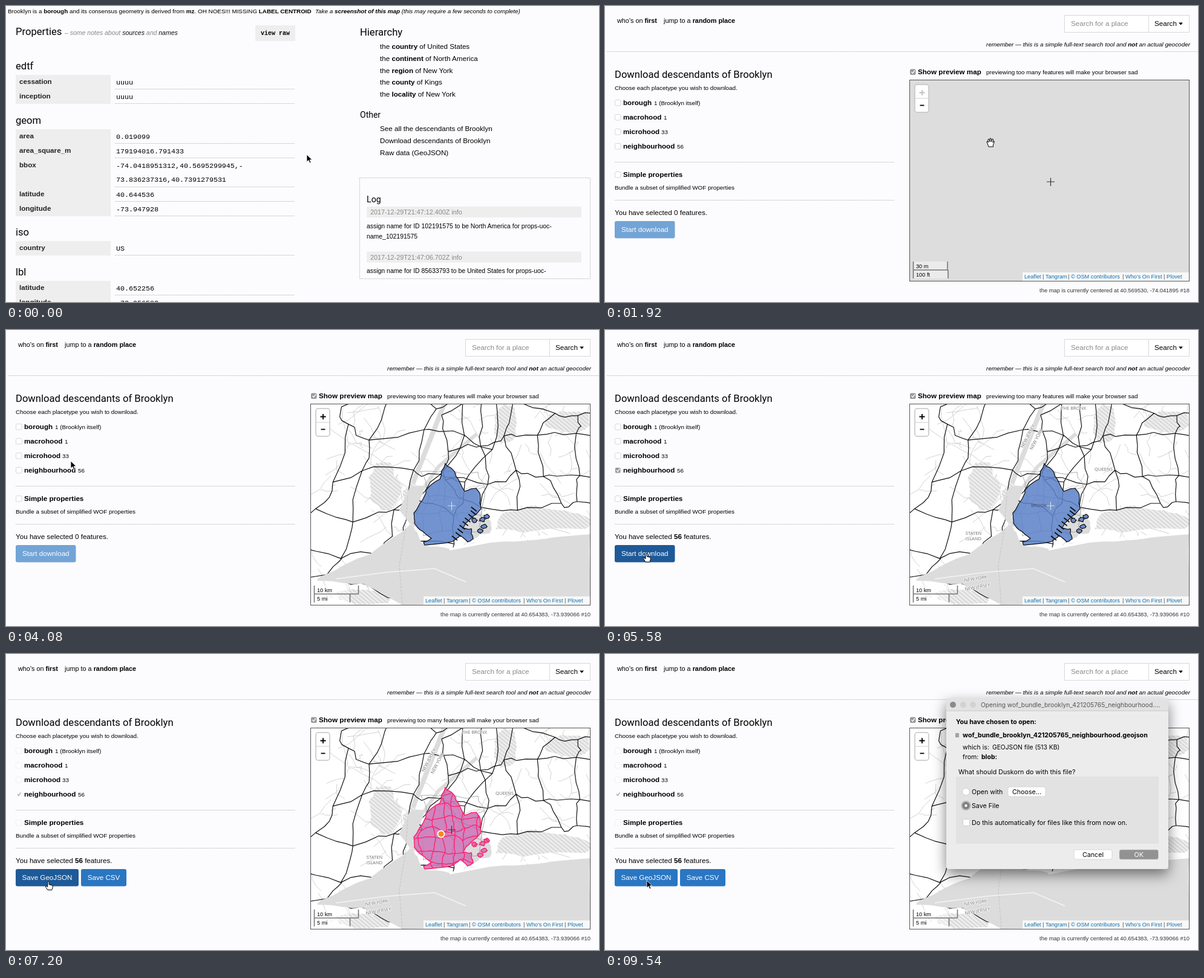
An HTML page for the animation above (9600 ms loop, 980 by 490 pixels).

```html
<!DOCTYPE html>
<html lang="en">
<head>
<meta charset="utf-8">
<title>Download descendants</title>
<style>
  html, body { margin: 0; height: 100%; overflow: hidden; background: #fcfcfe; }
  svg { display: block; font-family: "Liberation Sans", Arial, sans-serif; }
  .head { font-family: Roboto, sans-serif; }
  .mono { font-family: "Liberation Mono", monospace; }
  .mac { font-family: Inter, sans-serif; }
  .place { font-family: "Open Sans", sans-serif; fill: #777; text-anchor: middle;
           stroke: #fafafa; stroke-width: 1.6px; paint-order: stroke; }
  .dots { fill: none; stroke: #bdbdbd; stroke-dasharray: 1.5 1; }
  .line { fill: none; stroke-linejoin: round; }
  #dialog { filter: drop-shadow(0 9px 11px rgba(0, 0, 0, .5)); }
</style>
</head>
<body>
<svg id="stage" width="980" height="490" viewBox="0 0 980 490"></svg>
<script>
const SMALL = 9.87, BODY = 11.65, TITLE = 16.6;
const PALE = '#eee', SEA = '#dcdcdc', GREY = '#888', BLUE = '#2a76c2', DARK_BLUE = '#1e5a98';
const $ = id => document.getElementById(id);

const text = (x, y, size, str, attrs = '') =>
  `<text x="${x}" y="${y}" font-size="${size}" ${attrs}>${str}</text>`;
const b = str => `<tspan font-weight="700">${str}</tspan>`;
const rect = (x, y, w, h, fill, attrs = '') =>
  `<rect x="${x}" y="${y}" width="${w}" height="${h}" fill="${fill}" ${attrs}/>`;
const dot = (x, y, r, fill, attrs = '') => `<circle cx="${x}" cy="${y}" r="${r}" fill="${fill}" ${attrs}/>`;
const path = (d, attrs) => `<path d="${d}" ${attrs}/>`;
const stroke = (d, color, width, attrs = '') =>
  path(d, `class="line" stroke="${color}" stroke-width="${width}" ${attrs}`);
const rule = (x1, x2, y) => path(`M${x1} ${y}.5H${x2}`, 'class="dots"');
const group = (id, body, attrs = '') => `<g id="${id}" ${attrs}>${body}</g>`;
const italic = 'font-style="italic"', bold = 'font-weight="700"', head = 'class="head"';

// ---- Record page
function recordPage() {
  const sections = [
    ['edtf', 114, [['cessation', 'uuuu'], ['inception', 'uuuu']]],
    ['geom', 204, [['area', '0.019099'], ['area_square_m', '179194016.791433'],
      ['bbox', '-74.0418951312,40.5695299945,-', '73.836237316,40.7391279531'],
      ['latitude', '40.644536'], ['longitude', '-73.947928']]],
    ['iso', 389, [['country', 'US']]],
    ['lbl', 455, [['latitude', '40.652256'], ['longitude', '-73.956582']]],
  ];
  const table = sections.map(([name, top, rows]) => {
    let out = text(16, top - 9.5, TITLE, name, head), y = top;
    for (const [key, ...values] of rows) {
      const h = 24 * values.length;
      out += rect(16, y, 157, h, PALE) + text(22, y + 15, BODY, key, bold + ' fill="#222"');
      values.forEach((v, i) => out += text(182, y + 15.5 + 23.5 * i, 11.67, v, 'class="mono"'));
      y += h;
      out += rule(180, 477, y - 1);
    }
    return out;
  }).join('');

  const parents = [['country', 'United States'], ['continent', 'North America'],
    ['region', 'New York'], ['county', 'Kings'], ['locality', 'New York']];
  const links = ['See all the descendants of Brooklyn', 'Download descendants of Brooklyn', 'Raw data (GeoJSON)'];
  const stamp = (y, time) => rect(596, y, 355, 18, PALE) + text(602, y + 13, 10.8, `2017-12-29T${time}Z info`, `fill="${GREY}"`);

  return text(3, 12, SMALL, `Brooklyn is a ${b('borough')} and its consensus geometry is derived from ${b('mz')}. OH NOES!!! MISSING ${b('LABEL CENTROID')}`) +
    text(511, 12, SMALL, `Take a ${b('screenshot of this map')} (this may require a few seconds to complete)`, italic) +
    text(16, 48, TITLE, 'Properties', head) +
    text(97, 48, 10.5, '– some notes about <tspan fill="#111">sources</tspan> and <tspan fill="#111">names</tspan>', `${italic} fill="${GREY}"`) +
    rect(412, 32, 66, 26, PALE) + text(421, 48, 10, 'view raw', 'class="mono" font-weight="700"') +
    table +
    text(585, 48.5, TITLE, 'Hierarchy', head) +
    parents.map(([kind, name], i) => text(618, 71 + 19.8 * i, BODY, `the ${b(kind)} of ${name}`)).join('') +
    text(585, 185, 14, 'Other', head) +
    links.map((s, i) => text(618, 207 + 20 * i, BODY, s)).join('') +
    rect(584.5, 284.5, 381, 167, 'none', 'class="dots"') +
    text(596, 324.5, 14.2, 'Log', head) +
    stamp(332, '21:47:12.400') +
    text(596, 367.5, 10.45, 'assign name for ID 102191575 to be North America for props-uoc-') +
    text(596, 385, 10.45, 'name_102191575') +
    stamp(406.5, '21:47:06.702') +
    text(596, 442, 10.45, 'assign name for ID 85633793 to be United States for props-uoc-');
}

// ---- Map geometry, grown from a few key points and seeded noise
let seed = 11;
const random = () => (seed = seed * 16807 % 2147483647) / 2147483647;
const jitter = amount => (random() * 2 - 1) * amount;
const pairs = str => str.match(/\d+ \d+/g).map(p => p.split(' ').map(Number));

// Polyline roughened by repeated midpoint displacement
function rough(points, amount, depth = 2) {
  for (; depth--; amount /= 2) {
    points = points.flatMap((p, i) => {
      const q = points[i + 1];
      return q ? [p, [(p[0] + q[0]) / 2 + jitter(amount), (p[1] + q[1]) / 2 + jitter(amount)]] : [p];
    });
  }
  return 'M' + points.map(p => p.map(v => v.toFixed(1)).join(' ')).join('L');
}
const shape = (points, amount) => rough([...points, points[0]], amount) + 'Z';
const blob = (x, y, rx, ry) => shape(Array.from({ length: 7 }, (_, i) =>
  [x + rx * Math.cos(i * .9) + jitter(rx * .2), y + ry * Math.sin(i * .9) + jitter(ry * .2)]), Math.min(rx, ry) * .2);

// Irregular grid of roads or borders; skew leans the columns
function network(x, y, w, h, step, skew, wobble) {
  const cols = Math.ceil(w / step) + 1, rows = Math.ceil(h / step) + 1;
  const node = Array.from({ length: rows }, (_, j) => Array.from({ length: cols }, (_, i) =>
    [x + i * step + (rows - j) * skew + jitter(step * .35), y + j * step + jitter(step * .35)]));
  const columns = node[0].map((_, i) => node.map(row => row[i]));
  return [...node, ...columns].map(points => rough(points, wobble)).join('');
}

const borough = shape(pairs('726 221 717 247 694 265 688 282 674 303 675 320 688 333 703 345 690 351 692 356 738 350 750 340 763 351 772 346 769 329 755 328 768 312 785 296 784 277 777 262 758 267 743 241 735 228'), 1.8) +
  pairs('774 315 787 314 795 309 790 325 784 333').map(([x, y]) => blob(x, y, 5, 3.5)).join('');
const sea = shape(pairs('668 322 600 372 520 408 516 415 590 420 655 455 965 455 965 338 800 350 735 363 692 357 680 335'), 4) +
  shape(pairs('692 258 668 260 650 298 672 324 690 334 672 310'), 3) + blob(780, 322, 25, 22);
const hudson = 'M724 123L664 275', eastRiver = 'M778 172L715 226 690 262';

function creeks() {
  let d = '';
  for (let i = 0; i < 9; i++) d += `M${738 + i * 4 + jitter(3)} ${341 - i * 6}l9 7`;
  return d;
}

function lanes() {
  let d = '';
  for (let i = 0; i < 110; i++) {
    const x = 504 + random() * 461, y = 123 + random() * 300;
    d += rough([[x, y], [x + 30 + jitter(30), y + jitter(60)]], 8);
  }
  return d;
}

function mapPanel() {
  const label = (x, y, str, turn = 0) =>
    text(x, y, 7.6, str, `class="place" transform="rotate(${turn} ${x} ${y})"`);
  const marsh = blob(622, 258, 28, 42) + blob(885, 315, 88, 24) + blob(595, 442, 55, 14) + blob(826, 158, 22, 34) + blob(930, 150, 38, 20) + blob(672, 282, 16, 26);
  const tiles = stroke(lanes(), '#c6c6c6', .8) +
    stroke(hudson, SEA, 8) + stroke(eastRiver, SEA, 6) +
    path(marsh, 'fill="url(#hatch)"') +
    stroke(network(440, 115, 230, 300, 62, 22, 9), '#111', 1.2) +
    stroke(network(742, 130, 230, 165, 55, -4, 8), '#111', 1.2) +
    path(sea, `fill="${SEA}"`) +
    stroke('M733 363L800 350 965 336', '#fff', 4) +
    stroke('M545 412L630 401 708 395 760 417', '#f4f4f4', 1.6) +
    stroke('M664 275L660 330 650 390 655 455', '#c4c4c4', 1, 'stroke-dasharray="4 2"') +
    stroke(network(690, 235, 90, 95, 32, 0, 4), '#999', .8);
  const names = label(774, 132, 'THE BRONX') + label(701, 177, 'NEW JERSEY', -62) + label(715, 182, 'NEW YORK', -62) +
    label(824, 233, 'QUEENS') + label(609, 339, 'STATEN') + label(609, 348, 'ISLAND') +
    label(613, 414, 'NEW YORK', -9) + label(616, 428, 'NEW JERSEY', -10);
  const credits = [[693, 'Leaflet'], [728, 'Tangram'], [770, '© OSM contributors'], [860, "Who's On First"], [928, 'Plovet']];

  return rect(504, 123, 461, 332, '#fff', 'id="ground"') +
    '<g clip-path="url(#frame)">' + group('tiles', tiles) + group('names', names) +
    group('borough', path(borough, 'id="land" fill-opacity=".86" stroke="#0b0b10" stroke-width="1.2"') + stroke(creeks(), '#0b0b10', 1.6)) +
    text(717, 293, 7.6, 'BROOK', 'id="kings" class="place" style="stroke:none;fill:#3f4c66"') +
    group('hoods', path(borough, 'fill="#cb7bba" fill-opacity=".92" stroke="#ff2470" stroke-width="1.6"') +
      stroke(network(668, 216, 120, 140, 18, 0, 2), '#ff2470', 1.4, 'clip-path="url(#inside)"') +
      dot(719, 298, 5.5, '#f58a1c', 'stroke="#fff" stroke-width="1.8"')) + '</g>' +
    path('M730 291H743M736.5 284.5V298', 'id="cross" stroke-width="1.2"') +
    rect(512, 130, 23, 46, '#fff', 'rx="4" stroke="#c4c4c4" stroke-width="1.5"') + path('M512 153H535', 'stroke="#d0d0d0"') +
    path('M519.5 143.5H528.5M524 139V148', 'id="plus" stroke-width="1.8"') + path('M520.5 164.5H527.5', 'stroke="#000" stroke-width="1.8"') +
    rect(509, 423, 58, 28, '#fff', 'fill-opacity=".4"') +
    path('', 'id="scale" fill="none" stroke="#777" stroke-width="1.6"') +
    text(514, 434, 9.2, '', 'id="metric"') + text(514, 448, 9.2, '', 'id="imperial"') +
    rect(690, 441, 275, 14, '#fff', 'fill-opacity=".8"') +
    credits.map(([x, s], i) => text(x, 451, 9.2, s, 'fill="#0a70b4"') + (i ? text(x - 5, 451, 9.2, '|', 'fill="#444"') : '')).join('') +
    rect(503.5, 122.5, 462, 333, 'none', 'stroke="#555"') +
    text(966, 474, 9.33, '', 'id="centre" text-anchor="end" fill="#333"');
}

// ---- Download page
const checkbox = (x, y) => rect(x + .5, y - 4.5, 9.5, 9.5, '#fff', 'rx="2" stroke="#d6d6d6"');
const checked = (x, y, id) => group(id, rect(x + .5, y - 4.5, 9.5, 9.5, '#999', 'rx="2"') +
  stroke(`M${x + 3} ${y}l2 2.4 3.4-5`, '#fff', 1.4));
const button = (id, x, w, str) => group(id,
  rect(x, 356, w, 28.5, BLUE, 'rx="3"') + text(x + w / 2, 373.5, BODY, str, 'fill="#fff" text-anchor="middle"'));

function downloadPage() {
  const kinds = [['borough', 81, '1 (Brooklyn itself)'], ['macrohood', 97, '1'], ['microhood', 93, '33'], ['neighbourhood', 119, '56']];
  return text(20, 27.5, 10.85, `who's on ${b('first')}`) + text(97, 27.5, 10.85, `jump to a ${b('random place')}`) +
    rect(759.5, 15.5, 206, 28, '#fff', 'stroke="#d8d8d8"') + path('M898.5 16V43', 'stroke="#d8d8d8"') +
    text(770, 32.5, BODY, 'Search for a place', 'fill="#8a8a8a"') + text(908, 32.5, BODY, 'Search') + path('M948 27.5h7l-3.5 4z', '') +
    text(967, 67, 9.95, `remember — this is a simple full-text search tool and ${b('not')} an actual geocoder`, italic + ' text-anchor="end"') +
    rule(3, 980, 75) + rule(16, 478, 258) + rule(16, 478, 321) +
    text(16, 119, TITLE, 'Download descendants of Brooklyn', head) +
    text(16, 139, SMALL, 'Choose each placetype you wish to download.') +
    kinds.map(([name, x, n], i) => text(30, 163.5 + 24 * i, BODY, name, bold) + text(x, 163.5 + 24 * i, SMALL, n)).join('') +
    group('boxes', [160, 184, 208, 232, 279].map(y => checkbox(16, y)).join('')) + checked(16, 232, 'tick') +
    text(30, 283, BODY, 'Simple properties', bold) + text(16, 304, SMALL, 'Bundle a subset of simplified WOF properties') +
    text(16, 345.5, BODY, '', 'id="count"') +
    button('start', 16, 99.5, 'Start download') + button('json', 16, 104, 'Save GeoJSON') + button('csv', 124, 75, 'Save CSV') +
    checked(503.5, 109, 'preview') + text(517, 113, BODY, 'Show preview map', bold) +
    text(630, 113, SMALL, 'previewing too many features will make your browser sad') + mapPanel();
}

function dialogBox() {
  const mac = (x, y, size, str, attrs = '') => text(x, y, size, str, 'class="mac" ' + attrs);
  const macButton = (x, y, w, str, fill, ink) =>
    rect(x, y, w, 16, fill, 'rx="3" stroke="#ccc" stroke-width=".7"') + mac(x + w / 2, y + 12, 10.7, str, `text-anchor="middle" fill="${ink}"`);
  return rect(564, 73, 367, 283, '#ececec', 'rx="4"') + rect(564, 73, 367, 21, '#e2e2e2', 'rx="4"') +
    path('M564 94H931', 'stroke="#c8c8c8"') +
    dot(575, 84, 5, '#8a8a8a') + dot(592, 84, 5, '#d2d2d2') + dot(608, 84, 5, '#d2d2d2') +
    mac(621, 87.5, 10.25, 'Opening wof_bundle_brooklyn_421205765_neighbourhood....', 'fill="#555"') +
    mac(580, 116, 10.6, 'You have chosen to open:', bold) +
    rect(579, 131, 6, 7, '#a3a3a3') + mac(591, 138, 10.65, 'wof_bundle_brooklyn_421205765_neighbourhood.geojson', bold) +
    mac(591, 157.5, 10.6, 'which is:') + mac(640, 157.5, 10.3, 'GEOJSON file (513 KB)') +
    mac(591, 173.5, 10.6, 'from:') + mac(622, 173.5, 10.5, 'blob:', bold) +
    mac(584, 199, 10.7, 'What should Duskorn do with this file?') +
    rect(580, 203, 335, 111, '#e2e2e2') +
    dot(596.5, 228, 6, '#fff', 'stroke="#ccc"') + mac(606, 232, 10.7, 'Open with') + macButton(666, 220, 62, 'Choose...', '#fff', '#000') +
    dot(596.5, 251, 8, '#b4b4b4') + dot(596.5, 251, 6, '#808080') + dot(596.5, 251, 2.2, '#fff') + mac(606, 255, 10.7, 'Save File') +
    rect(591.5, 273.5, 11, 11, '#fff', 'rx="2" stroke="#ccc"') + mac(606, 283, 10.7, 'Do this automatically for files like this from now on.') +
    macButton(775, 324, 63, 'Cancel', '#fff', '#000') + macButton(850, 324, 64.5, 'OK', '#929292', '#fff');
}

const cursors =
  path('M0 0V12L3 9.4 5 14 7 13.1 5 8.7H9Z', 'id="arrow" fill="#000" stroke="#fff" stroke-width=".8"') +
  path('M-1 .5Q0-1 1.3 .5V5L6 6.2Q8 7 7.5 9L6 14H-1L-4.5 8.5Q-4.6 6.8-3 7.3L-1 9Z', 'id="finger" fill="#fff" stroke="#000"') +
  path('M-3 7L-6-1Q-5.5-3-4-1.5L-3.5 0-4-5Q-3-7-1.8-5L-1-1V-6.5Q0-8 1-6.5L1.5-1 2.5-5.5Q4-7 4.5-5L4 0Q6-4 6.5-1.5L4.5 4V7Z', 'id="grab" fill="#fff" stroke="#000"');

$('stage').innerHTML = `<defs>
  <pattern id="hatch" width="5" height="5" patternUnits="userSpaceOnUse" patternTransform="rotate(40)">
    <rect width="5" height="5" fill="#ededed"/><path d="M0 1H5" stroke="#c2c2c2"/></pattern>
  <clipPath id="frame"><rect x="504" y="123" width="461" height="332"/></clipPath>
  <clipPath id="inside"><path d="${borough}"/></clipPath></defs>` +
  group('record', recordPage()) + group('download', downloadPage()) + group('dialog', dialogBox()) + group('cursor', cursors);

// ---- Timeline, in ms
const LOOP = 9600, STEP = 60;
const LOADED = 1320, ZOOMED = 2520, TILED = 3600, NAMED = 4260, TICKED = 4620, STARTED = 5760, FETCHED = 6420, SAVED = 7800;
const track = [[0, 497, 246], [180, 497, 246], [840, 637, 221], [1500, 637, 226], [3420, 637, 226],
  [4080, 107, 217], [4440, 21, 231], [4800, 21, 231], [5340, 68, 370], [6000, 68, 370], [6900, 70, 377], [8000, 69, 375]];

function pointerAt(t) {
  const i = track.findIndex(k => k[0] > t);
  if (i < 0) return track.at(-1).slice(1);
  const [t0, x0, y0] = track[i - 1], [t1, x1, y1] = track[i];
  const u = (t - t0) / (t1 - t0), e = u * u * (3 - 2 * u);
  return [x0 + (x1 - x0) * e, y0 + (y1 - y0) * e];
}

const show = (id, on) => $(id).setAttribute('display', on ? 'inline' : 'none');
const set = (id, name, value) => $(id).setAttribute(name, value);
const tint = (id, fill) => $(id).firstChild.setAttribute('fill', fill);

function draw(t) {
  const [x, y] = pointerAt(t);
  const wide = t >= ZOOMED, ticked = t >= TICKED, started = t >= STARTED, fetched = t >= FETCHED, saved = t >= SAVED;
  const hover = x < 120 && y > 356 && !saved;

  show('record', t < LOADED);
  show('download', t >= LOADED);
  show('dialog', saved);

  set('ground', 'fill', wide ? '#fff' : '#ddd');
  show('tiles', t >= TILED);
  show('names', t >= NAMED);
  show('kings', t >= NAMED && !fetched);
  show('borough', wide && !fetched);
  set('land', 'fill', t >= TILED ? '#5b82c8' : '#7f8ab8');
  show('hoods', fetched);
  set('cross', 'stroke', wide && !fetched ? '#d8dce4' : '#333');
  set('plus', 'stroke', wide ? '#000' : '#c0c0c0');
  const [long, short] = wide ? [582.5, 568.5] : [566, 567];
  set('scale', 'd', `M509.5 423V451M509 437H${Math.max(long, short)}M${long} 423V437M${short} 437V451`);
  $('metric').textContent = wide ? '10 km' : '30 m';
  $('imperial').textContent = wide ? '5 mi' : '100 ft';
  $('centre').textContent = 'the map is currently centered at ' + (wide ? '40.654383, -73.939066 #10' : '40.569530, -74.041895 #18');

  show('tick', ticked);
  tint('tick', started ? '#fafafa' : '#999');
  set('tick', 'stroke', '#fff');
  $('tick').lastChild.setAttribute('stroke', started ? '#aaa' : '#fff');
  set('boxes', 'opacity', started ? .35 : 1);
  $('count').innerHTML = `You have selected ${ticked ? b(56) : 0} features.`;
  show('start', !fetched);
  show('json', fetched);
  show('csv', fetched);
  tint('start', hover && !started ? DARK_BLUE : BLUE);
  set('start', 'opacity', ticked && !started ? 1 : .65);
  tint('json', hover ? DARK_BLUE : BLUE);

  const link = t < LOADED ? x > 616 : hover;
  const grab = t >= LOADED && x > 504;
  show('finger', link);
  show('grab', grab);
  show('arrow', !link && !grab);
  set('cursor', 'transform', `translate(${x} ${y})`);
}

function tick() {
  draw(Math.floor(performance.now() % LOOP / STEP) * STEP);
  requestAnimationFrame(tick);
}
tick();
</script>
</body>
</html>
```
